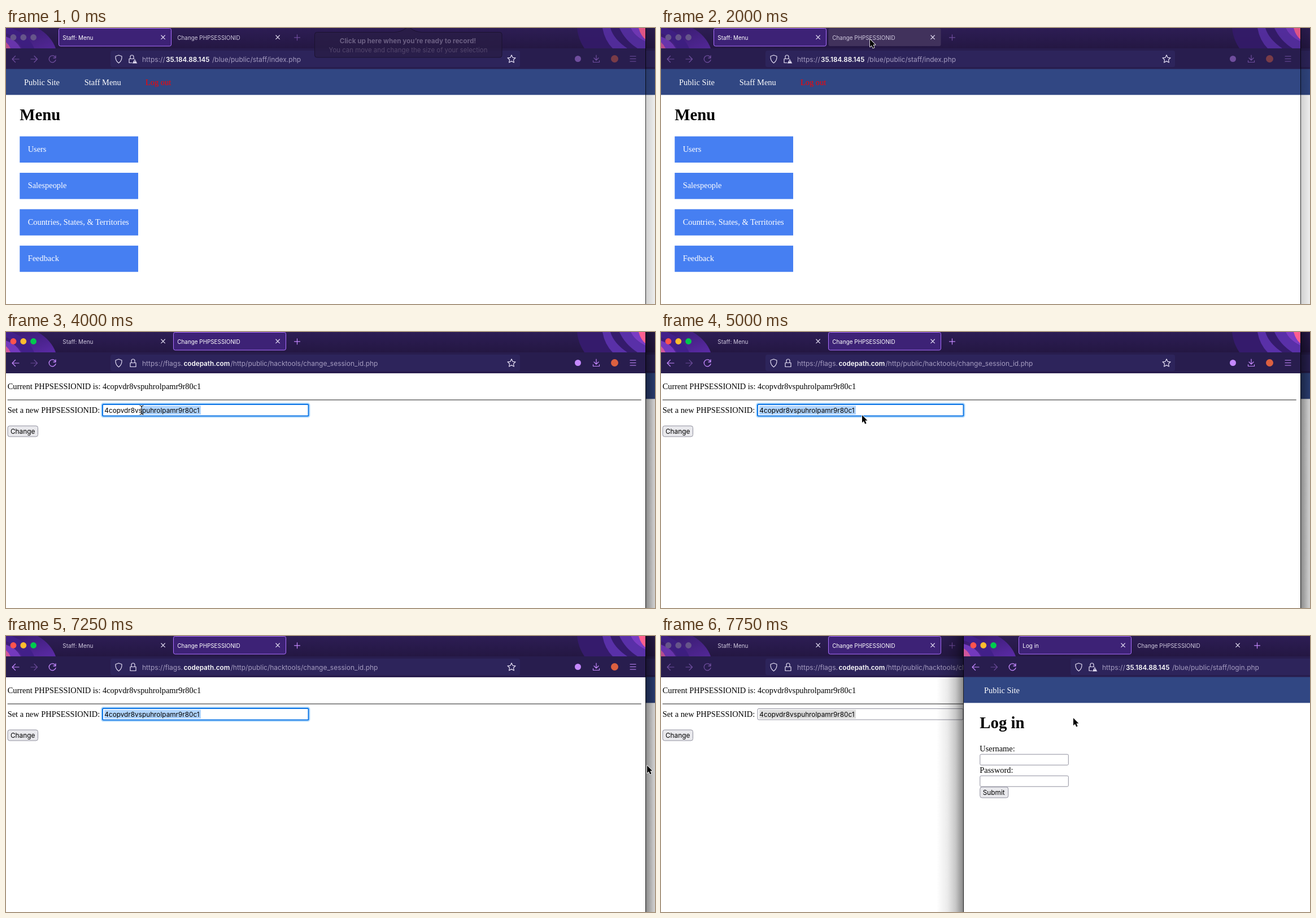
An HTML page that plays this animation: 1149 by 488 pixels, repeating every 8000 ms.

```html
<!DOCTYPE html>
<html lang="en">
<head>
<meta charset="utf-8">
<title>Session ID change</title>
<style>
html, body { margin: 0; width: 100%; height: 100%; overflow: hidden; background: #fff; }
svg { display: block; width: 1149px; height: 488px; }
text { white-space: pre; }
.ui { font-family: Inter, "Noto Sans", sans-serif; }
.page { font-family: "Liberation Serif", "Noto Serif", serif; }
</style>
</head>
<body>
<svg viewBox="0 0 1149 488">
  <defs>
    <linearGradient id="strip" x2="0" y2="1">
      <stop stop-color="#2d1d54"/><stop offset="1" stop-color="#241743"/>
    </linearGradient>
    <linearGradient id="swirl" x2="1" y2="1">
      <stop stop-color="#35196c"/><stop offset="1" stop-color="#5b2ba6"/>
    </linearGradient>
    <linearGradient id="shade">
      <stop stop-opacity=".48"/><stop offset=".3" stop-opacity=".22"/>
      <stop offset=".6" stop-opacity=".08"/><stop offset="1" stop-opacity="0"/>
    </linearGradient>
  </defs>
  <g id="scene"></g>
</svg>
<script>
const STEP = 250, LOOP = 8000;
const SESSION = '4copvdr8vspuhrolpamr9r80c1';
const ACCENT = '#c589ff', PALE = '#e6e0f5';

// Pointer path: step, x, y
const PATH = [
  [1, 882, 138], [2, 690, 126], [3, 473, 130], [4, 345, 134], [5, 262, 137],
  [6, 290, 100], [7, 345, 46], [8, 370, 20], [12, 370, 20], [13, 367, 62],
  [14, 362, 155], [15, 347, 138], [16, 240, 138], [17, 140, 118], [18, 165, 138],
  [19, 280, 143], [20, 356, 147], [21, 700, 225], [22, 1027, 292],
  [27, 1135, 229], [30, 1135, 229], [31, 730, 145]
];

const rect = (x, y, w, h, fill, more = '') =>
  `<rect x="${x}" y="${y}" width="${w}" height="${h}" fill="${fill}" ${more}/>`;
const circle = (x, y, r, fill, more = '') =>
  `<circle cx="${x}" cy="${y}" r="${r}" fill="${fill}" ${more}/>`;
const shape = (d, fill, more = '') => `<path d="${d}" fill="${fill}" ${more}/>`;
const line = (d, color, width = 1.2, more = '') =>
  shape(d, 'none', `stroke="${color}" stroke-width="${width}" stroke-linecap="round" stroke-linejoin="round" ${more}`);
const text = (kind, x, y, size, fill, str, more = '') =>
  `<text class="${kind}" x="${x}" y="${y}" font-size="${size}" fill="${fill}" ${more}>${str}</text>`;
const ui = (...args) => text('ui', ...args);
const serif = (x, y, str, fill = '#000') => text('page', x, y, 14.4, fill, str);
const heading = str => text('page', 24.3, 163, 28.8, '#000', str, 'font-weight="700"');
const field = (x, y, w, h) => rect(x, y, w, h, '#fff', 'stroke="#8f8f9d" rx="2"');
const button = (x, y, w, label) =>
  rect(x, y, w, 19, '#e9e9ed', 'stroke="#8f8f9d" rx="3.5"') + ui(x + 5, y + 14.3, 11.8, '#000', label);

function tab(x, label, selected, hover) {
  const fill = selected ? '#3d2276' : hover ? '#41325c' : 'none';
  return rect(x + .5, .5, 199, 31.5, fill, `rx="3" stroke="${selected ? '#ac70ff' : 'none'}"`)
    + ui(x + 7.3, 20.7, 9.9, selected ? '#fff' : '#cfc8de', label)
    + line(`M${x + 181.8} 13l6.6 6.6m0-6.6l-6.6 6.6`, PALE, 1.1);
}

function decor() {
  return shape('M-4 0H56Q80 14 88 36H-4Z', 'url(#swirl)')
    + shape('M-4 0H10Q40 12 50 36H28Q18 14-4 8Z', '#42208a')
    + shape('M-4 14Q18 20 26 36H-4Z', '#7339bd')
    + shape('M-4 22Q4 27 8 36H-4Z', '#d0569c')
    + shape('M1011 0Q1013 20 1024 36H1132V0Z', '#351b6c')
    + shape('M1056 0Q1060 22 1074 36H1100Q1076 20 1070 0Z', '#5930a8')
    + shape('M1086 0Q1096 22 1118 36H1132V24Q1112 14 1106 0Z', '#5930a8')
    + shape('M1106 0Q1112 14 1132 24V0Z', '#7a3cc4')
    + shape('M1120 0Q1124 14 1132 20V0Z', '#ff5f8f');
}

function toolbar(win, active) {
  const dim = active ? 1 : .45;
  const [start, host, rest] = win.url;
  const [hostX, restX] = win.urlX;
  const lockX = win.secure ? 225 : 223;
  const icons = line('M23 55H11m5.5-5.5L11 55l5.5 5.5', ACCENT)
    + line('M44 55H55.500m-5.500-5.500L55.500 55l-5.500 5.500', ACCENT, 1.2, `opacity="${active ? .42 : 1}"`)
    + line('M87.500 52A6 6 0 1 0 88 56.500M88 49v4h-4', ACCENT, 1.3)
    + circle(1012.5, 54.5, 5.5, ACCENT)
    + line('M1045 48v9m-4-4l4 4l4-4M1039.500 57.500v3h11v-3', ACCENT)
    + circle(1077.5, 54.5, 6.5, '#dc6040')
    + line('M1105 50h10m-10 4.500h10m-10 4.500h10', ACCENT);
  return rect(-4, 36, 1136, 37, '#281d4e')
    + rect(185, 40, 725, 29, '#2d245b', 'rx="3.5"')
    + `<g opacity="${dim}">${icons}</g>`
    + line('M199.500 48l5.500 2q.5 8-5.500 12q-6-4-5.500-12Z', PALE)
    + line(`M${lockX - 5} 54.500h10v7h-10zM${lockX - 3} 54v-3a3 3 0 0 1 6 0v3`, PALE)
    + (win.secure ? '' : shape('M228 54l5 9h-10Z', PALE, 'stroke="#2d245b"') + line('M228 57.500v2', '#2d245b', 1))
    + ui(241, 59.5, 12, '#a59cc0', start)
    + ui(hostX, 59.5, 11.7, '#fff', host, 'font-weight="600"')
    + ui(restX, 59.5, 12, '#a59cc0', rest)
    + line('M895 47.800l2.100 4.500l4.900.6l-3.600 3.300l1 4.800l-4.400-2.400l-4.400 2.400l1-4.800l-3.600-3.300l4.900-.6Z', PALE);
}

function browser(x, win, active, page) {
  const lights = active ? ['#ff544d', '#ffbd2e', '#00ca4e'] : Array(3).fill('#66558a');
  const tabs = win.tabs.map((label, i) =>
    tab(93 + i * 203, label, i === win.selected, i === win.hover)).join('');
  return `<g transform="translate(${x})">`
    + rect(-4, 0, 1136, 488, '#fff') + rect(-4, 0, 1136, 36, 'url(#strip)')
    + `<g opacity="${active ? 1 : .85}">${decor()}</g>`
    + lights.map((c, i) => circle(13 + i * 17.8, 16.5, 5.4, c)).join('')
    + tabs + line('M510.500 16.800h10m-5-5v10', ACCENT, 1.2, `opacity="${active ? 1 : .45}"`)
    + toolbar(win, active) + page + '</g>';
}

const navBar = rect(-4, 72.5, 1136, 45.8, '#314783') + serif(32, 101.3, 'Public Site', '#fff');

function menuPage() {
  const items = ['Users', 'Salespeople', 'Countries, States, &amp; Territories', 'Feedback'];
  return navBar + serif(138.8, 101.3, 'Staff Menu', '#fff') + serif(247, 101.3, 'Log out', '#f00')
    + heading('Menu')
    + items.map((label, i) => {
      const y = 191.6 + i * 64.4;
      return rect(24.3, y, 209.7, 46.4, '#467ff2') + serif(38.7, y + 27.2, label, '#fff');
    }).join('');
}

function sessionPage(focused, selectFrom, caret) {
  const box = focused
    ? rect(169, 126, 368.5, 24.5, '#fff', 'rx="3.5" stroke="#b5dcfb" stroke-width="2"')
      + rect(171, 128, 364.5, 20.5, '#fff', 'rx="1.5" stroke="#0a74e6" stroke-width="2"')
    : field(171, 128.5, 364, 19.5);
  return serif(2.7, 100.6, 'Current PHPSESSIONID is: ' + SESSION)
    + rect(2.7, 119.5, 1122, 1.1, '#333')
    + serif(2.7, 143, 'Set a new PHPSESSIONID:') + box
    + (selectFrom < 345 ? rect(selectFrom, 130.5, 345 - selectFrom, 15.5, focused ? '#b0d4fc' : '#dcdcdc') : '')
    + ui(174.3, 143, 11.8, '#000', SESSION)
    + (caret ? rect(345, 131, 1, 15, '#000') : '')
    + button(3, 166, 53.5, 'Change');
}

const loginPage = navBar + heading('Log in')
  + serif(24.3, 204, 'Username:') + field(24.8, 209.2, 156.5, 19)
  + serif(24.3, 241.6, 'Password:') + field(24.8, 247.2, 156.5, 19)
  + button(24.8, 267, 50, 'Submit');

const tooltip = shape('M550.500 7.500H688Q699 7 707 1Q712-3 717 1Q725 7 736 7.500H874Q878 7.500 878 11.500V48Q878 52 874 52H550.500Q546.500 52 546.500 48V11.500Q546.500 7.500 550.500 7.500Z',
    '#291d45', 'fill-opacity=".75" stroke="#1b1230"')
  + ui(711.5, 27.2, 11.7, '#6b5f83', 'Click up here when you’re ready to record!', 'font-weight="700" text-anchor="middle"')
  + ui(712, 43, 11.4, '#54476d', 'You can move and change the size of your selection', 'text-anchor="middle"');

function pointAt(step) {
  const i = PATH.findIndex(p => p[0] >= step);
  const b = PATH[i], a = PATH[Math.max(0, i - 1)];
  const k = b === a ? 0 : (step - a[0]) / (b[0] - a[0]);
  return [a[1] + (b[1] - a[1]) * k, a[2] + (b[2] - a[2]) * k];
}

function pointer(step) {
  const [x, y] = pointAt(step);
  const icon = step >= 15 && step <= 19
    ? line('M-3-8q3 0 3 2.500V5.500Q0 8-3 8M3-8q-3 0-3 2.500M0 5.500Q0 8 3 8', '#000', 1)
    : shape('M0 0V13.300L3 10.500L5.200 15.500L7.600 14.500L5.400 9.600H9.500Z', '#000',
        'stroke="#fff" stroke-width="1.6" paint-order="stroke" stroke-linejoin="round"');
  return `<g transform="translate(${x} ${y})">${icon}</g>`;
}

function draw(step) {
  const onMenu = step < 11, loginFront = step >= 30;
  const active = !onMenu && !loginFront;
  const selectFrom = step < 16 ? 345 : step === 16 ? 240 : 174;
  const caret = step < 13 || step === 15;
  const mainWin = {
    tabs: ['Staff: Menu', 'Change PHPSESSIONID'],
    selected: onMenu ? 0 : 1,
    hover: step >= 8 && onMenu ? 1 : -1,
    secure: !onMenu,
    url: onMenu ? ['https://', '35.184.88.145', '/blue/public/staff/index.php']
      : ['https://flags.', 'codepath.com', '/http/public/hacktools/change_session_id.php'],
    urlX: onMenu ? [283, 365] : [314.5, 397.5]
  };
  const loginWin = {
    tabs: ['Log in', 'Change PHPSESSIONID'], selected: 0, hover: -1, secure: false,
    url: ['https://', '35.184.88.145', '/blue/public/staff/login.php'], urlX: [283, 365]
  };
  const main = browser(0, mainWin, active, onMenu ? menuPage() : sessionPage(active, selectFrom, caret));
  const login = browser(540, loginWin, loginFront, loginPage);
  const shade = rect(0, 0, 48, 488, 'url(#shade)', loginFront ? 'transform="translate(536) scale(-1 1)"'
    : `transform="translate(1132)" opacity="${active ? 1 : .4}"`);
  const edge = rect(loginFront ? 535 : 1132, 0, 1, 488, '#000', 'opacity=".8"');
  return (loginFront ? main + shade + login : login + shade + main) + edge
    + (step ? pointer(step) : tooltip);
}

const scene = document.getElementById('scene');
let shown = -1;
function tick() {
  const step = Math.floor(performance.now() % LOOP / STEP);
  if (step !== shown) scene.innerHTML = draw(shown = step);
  requestAnimationFrame(tick);
}
tick();
</script>
</body>
</html>
```
